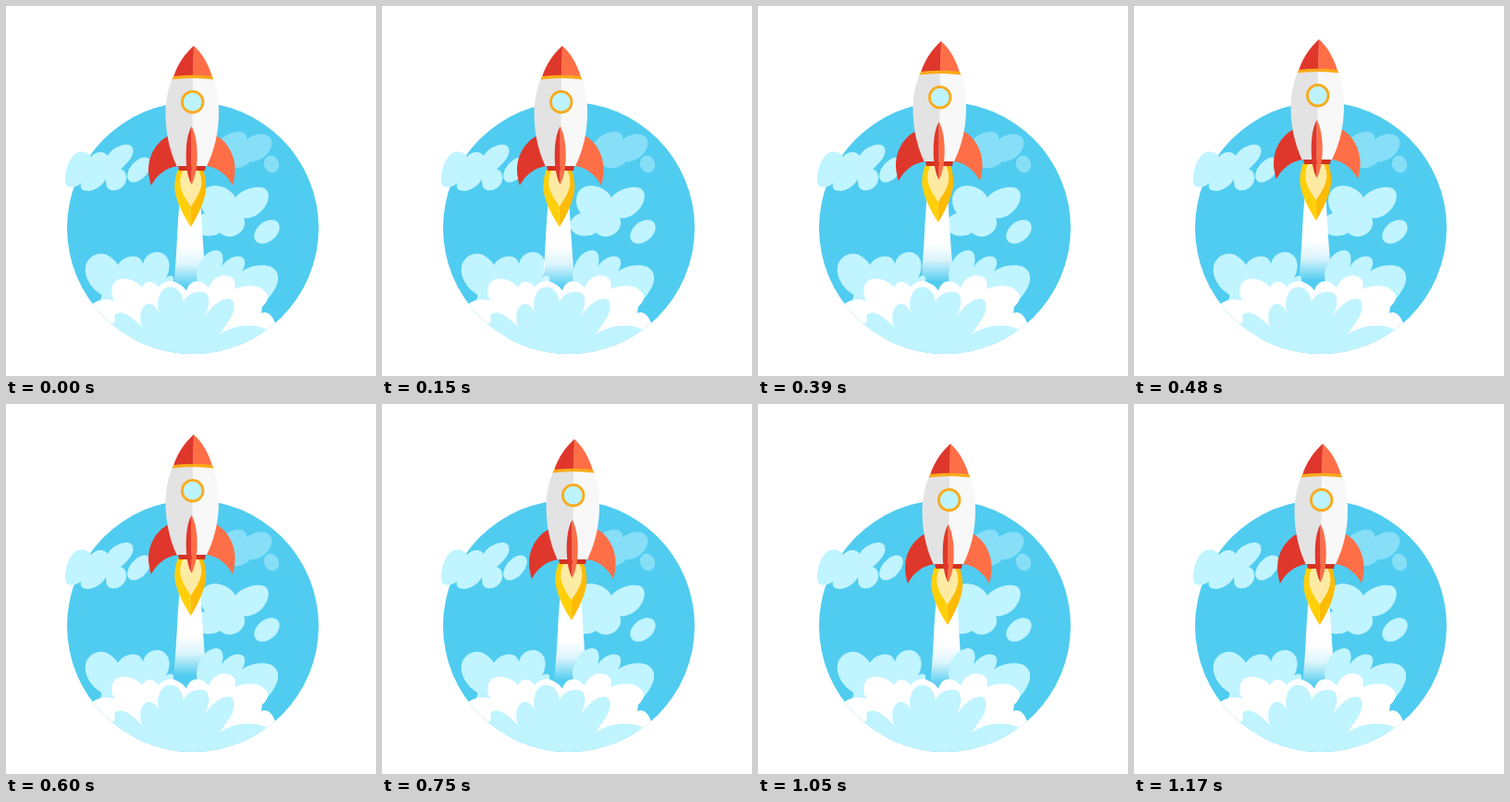
An HTML page that plays this animation: 400 by 400 pixels, repeating every 1.2 s.

```html
<!DOCTYPE html>
<html lang="en">
<head>
<meta charset="utf-8">
<title>Rocket launch</title>
<style>
  html, body { margin: 0; width: 100%; height: 100%; overflow: hidden; background: #fff; }
  svg { display: block; width: 100vw; height: 100vh; }
</style>
</head>
<body>
<svg viewBox="0 0 400 400">
  <defs>
    <linearGradient id="fade" gradientUnits="userSpaceOnUse" x1="0" y1="205" x2="0" y2="304">
      <stop offset="0" stop-color="#fff"/>
      <stop offset=".56" stop-color="#fff"/>
      <stop offset=".75" stop-color="#fff" stop-opacity=".8"/>
      <stop offset="1" stop-color="#fff" stop-opacity="0"/>
    </linearGradient>
    <clipPath id="disc"><circle cx="202" cy="240" r="136"/></clipPath>
  </defs>

  <circle cx="202" cy="240" r="136" fill="#50ccf0"/>

  <!-- sky clouds -->
  <g fill="#c0f4ff">
    <path d="M64 190C63 180 68 163 76 159C82 156 89 158 92 163C97 157 106 156 110 162C114 154 125 149 133 150C140 153 138 161 133 167C130 171 127 174 124 176C131 179 132 187 128 193C123 200 114 201 110 197C108 194 108 191 108 187C105 193 98 199 89 200C82 200 80 197 81 192C77 195 71 197 67 195C65 194 64 192 64 190Z"/>
    <ellipse cx="144" cy="177" rx="16" ry="9.5" transform="rotate(-48 144 177)"/>
    <path d="M203 238C203 231 208 226 215 224C208 216 208 201 218 196C228 191 243 197 248 207C254 199 272 192 281 198C288 205 281 220 271 226C265 229 260 230 257 229C261 238 254 247 245 249C239 250 234 248 231 245C224 251 206 250 203 238Z"/>
    <ellipse cx="282" cy="244" rx="15.5" ry="10.5" transform="rotate(-40 282 244)"/>
  </g>
  <g fill="#86def7">
    <path d="M224 160C226 148 236 138 249 136C257 135 261 139 260 144C267 139 275 137 281 139C289 142 289 151 284 158C279 165 270 169 264 168C259 174 249 177 242 174C238 172 236 169 235 166H228Z"/>
    <ellipse cx="287" cy="171" rx="8" ry="9.5" transform="rotate(-20 287 171)"/>
  </g>

  <!-- smoke behind the rocket -->
  <path fill="#c0f4ff" d="M99 321C102 318 104 315 103 312C91 305 84 292 86 281C89 270 100 265 109 269C115 272 119 276 121 280C125 273 134 269 141 271C145 272 147 275 148 279C149 271 157 265 165 266C175 268 178 277 176 286C175 290 174 292 173 294C178 290 182 292 181 297L178 325Z"/>

  <g id="rocket">
    <path fill="url(#fade)" d="M188 205L185.500 240Q184 275 181 305H217Q213 265 210 205Z"/>
    <g transform="translate(-1.200)">
      <path fill="#ffd00a" d="M187 177H201V239C195 229 183.500 210 183.500 195Q184 184 187 177Z"/>
      <path fill="#fdbb05" d="M201 177H214Q217 184 217.500 195C217.500 210 207 229 201 239Z"/>
      <path fill="#fdeba4" d="M193 177H209Q213 184 212.500 192C212 201 205 211 201 217C197 211 190 201 189.500 192Q189 184 193 177Z"/>
    </g>
    <path fill="#df372b" d="M176 140C160 148 151 167 155 186C155.500 189 156 192 157 194C163 183 172 175 186 173Z"/>
    <path fill="#ff6f47" d="M227 140C242 148 250 167 247 184C246.500 188 246 191 245 194C239 183 230 175 217 173Z"/>
    <path fill="#d3321f" d="M186 172.500H216L215 178H187Z"/>
    <path fill="#e3e3e4" d="M180 78H202V173H184.500C176 154 172.500 136 172.500 115C172.500 101 176 88 180 78Z"/>
    <path fill="#f8f8f9" d="M202 78H224C228 88 230 101 230 115C230 136 226 154 217 173H201Z"/>
    <path fill="#df372b" d="M203 43C194 51 185 63 181 77H202.500Z"/>
    <path fill="#ff6f47" d="M203 43C212 51 219 63 223 77H202Z"/>
    <path fill="#fbaa1a" d="M181 76Q202 73.500 223 76L224.500 79.500Q202 76.500 179.500 79.500Z"/>
    <circle cx="201.700" cy="103.700" r="11.300" fill="#bdf3ff" stroke="#f9ab1b" stroke-width="2.800"/>
    <path fill="#df372b" d="M200.700 130C196 138 194.700 150 194.700 162C194.700 175 197 187 200.700 193Z"/>
    <path fill="#ff6f47" d="M200.700 130C205 138 206.700 150 206.700 162C206.700 175 204 187 200.700 193Z"/>
  </g>

  <!-- smoke in front -->
  <path fill="#c0f4ff" d="M206 292C207 278 215 265 227 264C235 264 236 273 233 282C239 273 248 269 254 271C260 273 259 281 255 287C263 281 277 278 287 282C296 287 296 298 290 307C286 314 281 319 276 324L210 322Z"/>
  <g clip-path="url(#disc)">
    <path fill="#fff" d="M90 325C97 318 107 315 117 319C112 309 114 297 124 295C134 294 142 298 147 304C151 296 159 296 165 304C169 299 176 296 182 298C189 301 193 304 195 308C197 301 202 296 209 298C214 299 217 302 219 305C222 296 231 289 241 292C248 295 249 300 247 306C256 302 270 301 277 306C285 311 285 318 277 325L276 332C283 329 289 335 292 346L240 372H170L104 346Z"/>
    <path fill="#c0f4ff" d="M108 346C120 344 118 339 117 335C120 330 128 331 133 335C139 339 143 343 147 347C143 336 146 323 154 322C160 322 163 327 165 331C162 317 167 305 176 304C185 303 190 309 192 320C196 311 206 307 215 310C222 314 220 326 214 337C221 326 233 314 243 317C250 321 246 335 239 343C236 348 233 352 231 355C244 346 262 342 281 349L270 380H130Z"/>
  </g>
</svg>
<script>
  const LOOP = 1200, TICK = 30;
  // time, x, y of each corner of the flight
  const stops = [[0, 0, 0], [180, -10, 0], [600, 0, -10], [900, 10, 0], [LOOP, 0, 0]];
  const rocket = document.getElementById('rocket');

  function offset(t) {
    const i = stops.findIndex(s => s[0] > t);
    const [t0, x0, y0] = stops[i - 1], [t1, x1, y1] = stops[i];
    // the rocket moves in whole pixels
    const step = Math.round(10 * (t - t0) / (t1 - t0)) / 10;
    return [x0 + (x1 - x0) * step, y0 + (y1 - y0) * step];
  }

  function draw(ms) {
    const t = Math.floor((ms % LOOP) / TICK) * TICK;
    rocket.setAttribute('transform', `translate(${offset(t)})`);
  }

  const start = performance.now();
  function frame() {
    draw(performance.now() - start);
    requestAnimationFrame(frame);
  }
  frame();
</script>
</body>
</html>
```
